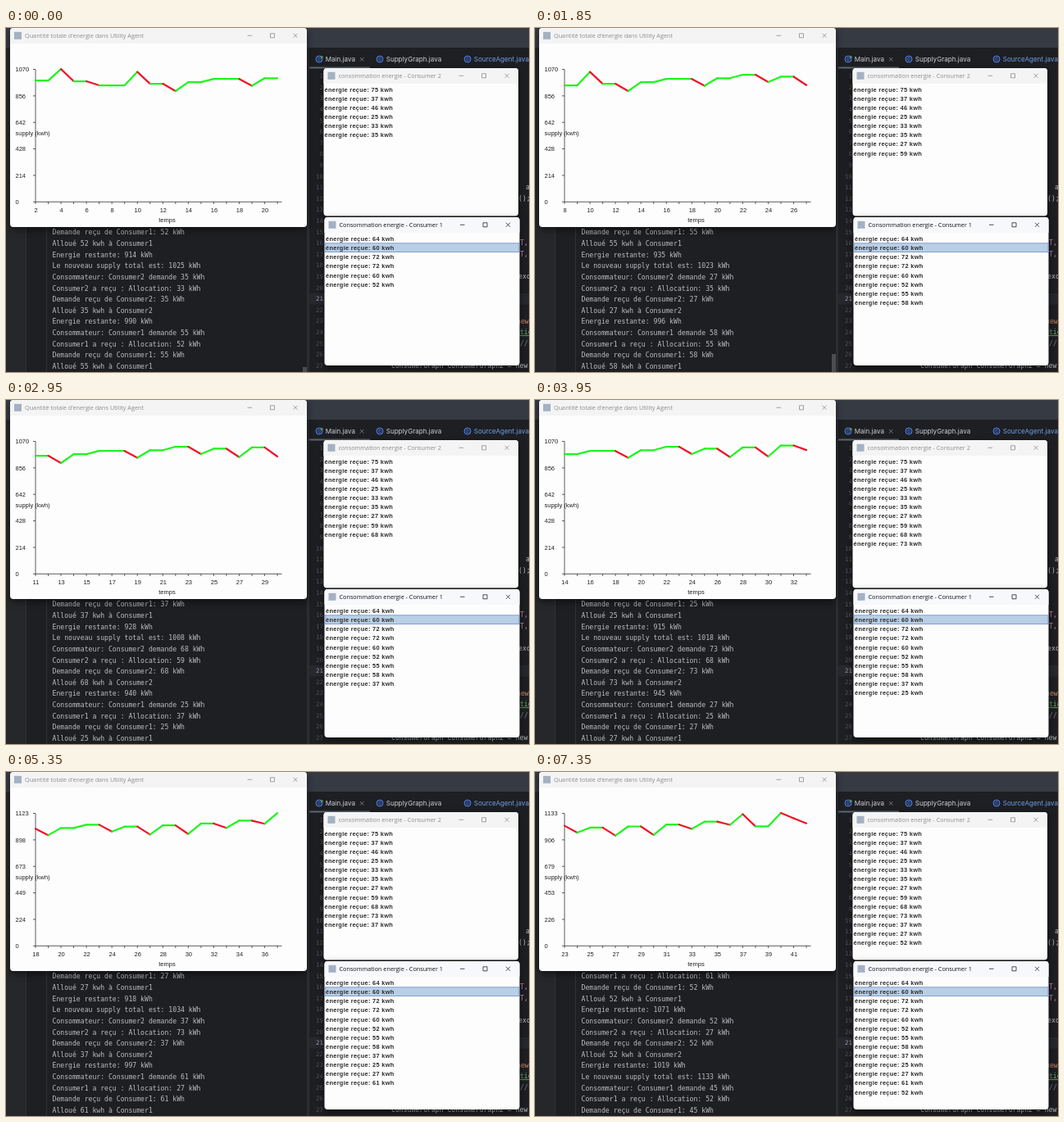
Animation, 638 px wide and 420 px high, one loop 7400 ms. Source, as an HTML page:

```html
<!DOCTYPE html>
<html lang="fr">
<head>
<meta charset="utf-8">
<title>Agents énergie</title>
<style>
  html, body { margin: 0; width: 100%; height: 100%; overflow: hidden; background: #1e1f22; }
  svg { display: block; width: 638px; height: 420px; }
  text { white-space: pre; }
  .mono { font: 8.15px "DejaVu Sans Mono", "Noto Sans Mono", monospace; fill: #bcbec4; }
  .num { fill: #4f535b; font-size: 7.4px; text-anchor: end; }
  .tab { font: 8.1px Inter, sans-serif; fill: #ced0d6; }
  .title { font: 7.25px "Open Sans", "Noto Sans", sans-serif; fill: #8c8c8c; }
  .active { fill: #111; }
  .row { font: bold 7.4px "Liberation Sans", Arial, sans-serif; letter-spacing: .3px; fill: #2b2b2b; }
  .axis { font: 7.5px "Liberation Sans", Arial, sans-serif; fill: #222; }
  .mid { text-anchor: middle; }
  .ink { stroke: #333; stroke-width: .8; fill: none; }
  .up, .down { stroke-width: 2.2; stroke-linecap: round; }
  .up { stroke: #1cf51c; }
  .down { stroke: #ee1328; }
  .window { filter: drop-shadow(0 3px 5px rgba(0, 0, 0, .5)); }
</style>
</head>
<body>
<svg viewBox="0 0 638 420">
  <rect width="638" height="420" fill="#1e1f22"/>
  <rect width="638" height="24" fill="#363a43"/>
  <rect y="24" width="24" height="396" fill="#25272a"/>
  <path d="M24.5 24V420M49.5 243V420" stroke="#303237"/>
  <rect id="thumb" x="362" width="5" height="22" fill="#4b4d51"/>
  <rect x="367" y="24" width="3" height="396" fill="#2b2d30"/>
  <rect x="370" y="324" width="268" height="13.6" fill="#26282e"/>
  <rect x="370" y="47.5" width="74" height="2" fill="#5d6776"/>
  <g id="editor"></g>
  <g id="console"></g>
  <g id="windows"></g>
  <rect x="389" y="262.8" width="237" height="10.8" fill="#b8cfe5" stroke="#6382bf" stroke-width=".7"/>
  <g id="list2"></g>
  <g id="list1"></g>
  <g id="chart"></g>
</svg>
<script>
const LOOP = 7400;
const $ = id => document.getElementById(id);
const text = (cls, x, y, s, style = '') =>
  `<text class="${cls}" x="${x}" y="${y}" dy=".35em" style="${style}">${s}</text>`;
const line = (cls, x1, y1, x2, y2) =>
  `<line class="${cls}" x1="${x1}" y1="${y1}" x2="${x2}" y2="${y2}"/>`;

// Editor: tabs, gutter and the code that shows around the windows
function drawEditor() {
  const tabs = [[382, 'Main.java', '#ced0d6'],
                [456, 'SupplyGraph.java', '#ced0d6'],
                [563, 'SourceAgent.java', '#6f9ce8']];
  let out = '';
  for (const [x, name, color] of tabs) {
    out += `<circle cx="${x}" cy="38" r="4" fill="#25324d" stroke="#548af7" stroke-width=".9"/>`
      + text('tab mid', x, 38, 'C', 'font-size:5px;fill:#548af7')
      + text('tab', x + 7.7, 38, name, `fill:${color}`);
  }
  out += '<path d="M384 33.5l3.5 2-3.5 2z" fill="#57965c"/>'
    + '<path d="M432 36l4.5 4.5m0-4.5l-4.5 4.5" stroke="#868a91" stroke-width=".8"/>';
  const rowY = n => 58.6 + (n - 1) * 13.6;
  for (let n = 1; n <= 27; n++) {
    out += text('mono num', 387, rowY(n), n, n === 21 ? 'fill:#a1a3ab' : '');
  }
  const code = [[634, 11, 'a', ''], [625, 12, '();', ''], [627, 16, 'T,', '#c77dbb'], [627, 17, 'T,', '#c77dbb'],
                [625, 19, 'exc', ''], [623, 23, 'new', '#cf8e6d'],
                [622, 24, 'atio', '#6aab73;text-decoration:underline'],
                [627, 25, '// ', '#7a7e85'], [470, 27, 'ConsumerGraph ConsumerGraph2 = new ', '']];
  for (const [x, n, s, color] of code) out += text('mono', x, rowY(n), s, color && `fill:${color}`);
  $('editor').innerHTML = out;
}

function windowFrame(x, y, w, h, title, active) {
  const mid = y + 9.3, right = x + w;
  const ink = active ? '#222' : '#8c8c8c';
  return `<rect class="window" x="${x}" y="${y}" width="${w}" height="${h}" rx="4" fill="#fefdfe"/>
    <path d="M${x} ${y + 19}v-15q0-4 4-4h${w - 8}q4 0 4 4v15z" fill="${active ? '#f6f8fc' : '#f4f4f5'}"/>
    <rect x="${x + 5}" y="${mid - 4.5}" width="9" height="9" fill="#a3b1c3"/>`
    + text('title' + (active ? ' active' : ''), x + 18, mid + .3, title)
    + `<path d="M${right - 72.5} ${mid}h5.5M${right - 44.5} ${mid - 2.5}h5v5h-5zM${right - 16.5} ${mid - 2.5}l5 5m0-5l-5 5"
        fill="none" stroke="${ink}" stroke-width=".8"/>`;
}

function drawWindows() {
  $('windows').innerHTML =
    windowFrame(5, 0, 362, 243, "Quantité totale d'energie dans Utility Agent", false)
    + windowFrame(387.5, 49, 237.5, 180.5, 'consommation energie - Consumer 2', false)
    + windowFrame(388.5, 231, 238, 181, 'Consommation energie - Consumer 1', true);
}

// Console log: each round is [supply, demand of 2, later supply, demand of 1]; 0 means no new supply
const rounds = [[1025, 35, 0, 55], [1023, 27, 0, 58], [1024, 59, 0, 37], [1008, 68, 0, 25],
                [1018, 73, 0, 27], [1034, 37, 0, 61], [1059, 27, 1123, 52], [0, 52, 1133, 45]];

function buildLog() {
  const log = [];
  const last = { 1: 52, 2: 33 };
  let energy = 966;
  const supply = s => {
    if (!s) return;
    energy = s;
    log.push(`Le nouveau supply total est: ${s} kWh`);
  };
  const allot = (id, kwh) => {
    energy -= kwh;
    log.push(`Demande reçu de Consumer${id}: ${kwh} kWh`,
             `Alloué ${kwh} kwh à Consumer${id}`,
             `Energie restante: ${energy} kWh`);
  };
  const ask = (id, kwh) => {
    log.push(`Consommateur: Consumer${id} demande ${kwh} kWh`,
             `Consumer${id} a reçu : Allocation: ${last[id]} kWh`);
    allot(id, kwh);
    last[id] = kwh;
  };
  allot(1, 52);
  for (const [s2, d2, s1, d1] of rounds) {
    supply(s2);
    ask(2, d2);
    supply(s1);
    ask(1, d1);
  }
  return log;
}
const log = buildLog();

function drawConsole(page) {
  $('console').innerHTML = log.slice(page * 11, page * 11 + 13)
    .map((s, i) => text('mono', 56.5, 249.6 + i * 13.62, s)).join('');
  // The scrollbar thumb rises once, then hides
  $('thumb').setAttribute('y', 414 - page * 16);
  $('thumb').setAttribute('opacity', page < 2 ? 1 : 0);
}

const received1 = [64, 60, 72, 72, 60, 52, 55, 58, 37, 25, 27, 61, 52];
const received2 = [75, 37, 46, 25, 33, 35, 27, 59, 68, 73, 37, 27, 52];
const arrivals1 = [250, 1260, 2270, 3280, 4290, 5300, 6450];

function drawList(id, values, count, x, y) {
  $(id).innerHTML = values.slice(0, count)
    .map((v, i) => text('row', x, y + i * 11.13, `énergie reçue: ${v} kwh`)).join('');
}

// Chart: twenty samples wide, the first sample stands at time 2
const samples = [977, 977, 1070, 971, 971, 938, 938, 938, 1047, 951, 951, 892, 964, 964,
  990, 990, 990, 935, 996, 996, 1024, 1024, 965, 1008, 1008, 940, 1018, 1018, 945,
  1034, 1034, 997, 1059, 1059, 1032, 1123, 1019, 1019, 1133, 1088, 1045];

function drawChart(start) {
  const top = Math.max(...samples.slice(0, start + 20));
  const base = 212.3;
  const px = i => 36 + i * 15.53;
  const py = v => base - .6 - v / top * 161.6;
  let out = line('ink', 36, 50.5, 36, base) + line('ink', 36, base, 336.5, base)
    + text('axis', 11.5, 128.3, 'supply (kwh)') + text('axis mid', 196.5, 234.3, 'temps');
  for (let i = 0; i <= 5; i++) {
    const y = base - i * 32.36;
    out += line('ink', 33, y, 36, y) + text('axis', 11.5, y + .2, Math.floor(top * i / 5));
  }
  for (let i = 0; i < 20; i++) {
    out += line('ink', px(i), base, px(i), 215);
    if (i % 2 === 0) out += text('axis mid', px(i) + .5, 222.2, start + i + 2);
  }
  for (let i = 0; i < 19; i++) {
    const a = samples[start + i], b = samples[start + i + 1];
    out += line(b < a ? 'down' : 'up', px(i), py(a), px(i + 1), py(b));
  }
  $('chart').innerHTML = out;
}

// Redraw a part only when its state changes
const shown = {};
function update(key, state, draw) {
  if (shown[key] === state) return;
  shown[key] = state;
  draw(state);
}
const ticks = (t, first, gap) => Math.max(0, Math.floor((t - first) / gap) + 1);

function frame() {
  const t = performance.now() % LOOP;
  update('chart', Math.min(21, Math.floor(t / 350 + .85)), drawChart);
  update('console', Math.min(7, ticks(t, 880, 1010)), drawConsole);
  update('list1', 6 + arrivals1.filter(a => a <= t).length, n => drawList('list1', received1, n, 390, 257.4));
  update('list2', Math.min(13, 6 + ticks(t, 700, 1010)), n => drawList('list2', received2, n, 388.5, 75.1));
  requestAnimationFrame(frame);
}

drawEditor();
drawWindows();
frame();
</script>
</body>
</html>
```
